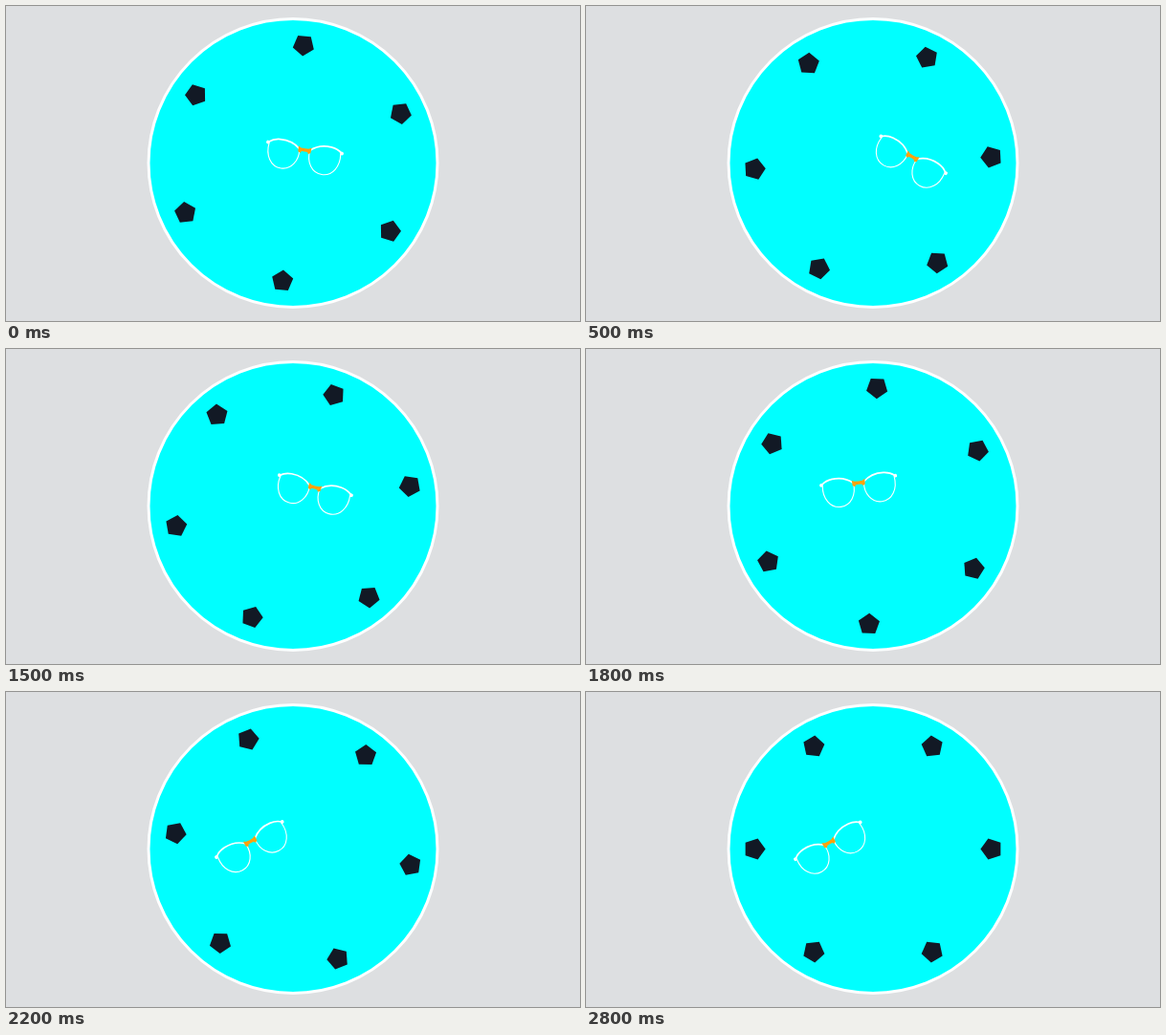
These frames come from a looping animation (600 px wide and 330 px high, 2.9 s). An HTML page with a canvas:

```html
<!DOCTYPE html>
<html lang="en">
<head>
<meta charset="utf-8">
<title>Swinging glasses</title>
<style>
  html, body { margin: 0; width: 100%; height: 100%; overflow: hidden; background: #dddfe1; }
  canvas { display: block; width: 600px; height: 330px; }
</style>
</head>
<body>
<canvas id="stage" width="600" height="330"></canvas>
<script>
const canvas = document.getElementById('stage');
const ctx = canvas.getContext('2d');
const scale = window.devicePixelRatio || 1;
canvas.width = 600 * scale;
canvas.height = 330 * scale;

const LOOP = 2900, STEP = 100;
const CENTER = { x: 300, y: 164.5 };
const ORBIT = 124, PENTAGON = 11.6;
const TILT = 29.7;
const rad = deg => deg * Math.PI / 180;
const mix = (a, b, p) => a + (b - a) * p;

// Ease-in-out, cubic-bezier(.42, 0, .58, 1)
function ease(x) {
  if (x <= 0) return 0;
  if (x >= 1) return 1;
  let lo = 0, hi = 1, t = 0.5;
  for (let i = 0; i < 24; i++) {
    t = (lo + hi) / 2;
    const bx = 3 * (1 - t) ** 2 * t * 0.42 + 3 * (1 - t) * t * t * 0.58 + t ** 3;
    if (bx < x) lo = t; else hi = t;
  }
  return t * t * (3 - 2 * t);
}
const progress = (time, start, duration) => ease((time - start) / duration);

// Swing to the right first, then over to the left along a higher arc
function poseAt(time) {
  if (time < 1000) {
    return {
      ring: mix(-30, 0, progress(time, -290, 1010)),
      tilt: mix(0, TILT, progress(time, -290, 767)),
      lift: 7.9
    };
  }
  return {
    ring: mix(0, -60, progress(time, 1083, 1490)),
    tilt: mix(TILT, -TILT, progress(time, 1073, 1265)),
    lift: 19.4
  };
}

function drawDisc() {
  ctx.beginPath();
  ctx.arc(CENTER.x, CENTER.y, 151, 0, Math.PI * 2);
  ctx.fillStyle = '#00ffff';
  ctx.fill();
  ctx.lineWidth = 3;
  ctx.strokeStyle = '#ffffff';
  ctx.stroke();
}

function drawRing(turn) {
  ctx.fillStyle = '#121925';
  for (let i = 0; i < 6; i++) {
    const a = rad(turn + i * 60);
    const cx = CENTER.x + ORBIT * Math.cos(a);
    const cy = CENTER.y + ORBIT * Math.sin(a);
    ctx.beginPath();
    for (let k = 0; k < 5; k++) {
      const v = a + Math.PI + rad(72 * k);
      ctx.lineTo(cx + PENTAGON * Math.cos(v), cy + PENTAGON * Math.sin(v));
    }
    ctx.fill();
  }
}

function drawLens(side) {
  ctx.save();
  ctx.scale(side, 1);
  ctx.strokeStyle = ctx.fillStyle = '#ffffff';
  ctx.lineCap = 'round';

  ctx.lineWidth = 1.1;
  ctx.beginPath();
  ctx.moveTo(5.5, 0);
  ctx.bezierCurveTo(4, 12, 11, 22.5, 21.5, 22.5);
  ctx.bezierCurveTo(33, 22.5, 39.5, 11, 37.8, -1.5);
  ctx.stroke();

  ctx.lineWidth = 1.7;
  ctx.beginPath();
  ctx.moveTo(5.5, -0.5);
  ctx.bezierCurveTo(12, -6.5, 20, -8, 27, -7.4);
  ctx.bezierCurveTo(32, -7, 36, -5, 38.5, -2.8);
  ctx.stroke();

  ctx.beginPath();
  ctx.arc(39, -2.5, 1.9, 0, Math.PI * 2);
  ctx.fill();
  ctx.restore();
}

function drawBridge() {
  const half = [[0, -1.7], [4, -2], [6.8, -3.5], [6.6, 2.2], [4.2, 3.4], [3, 1.6], [0, 1.5]];
  ctx.fillStyle = '#ffa20d';
  ctx.beginPath();
  half.forEach(([x, y]) => ctx.lineTo(x, y));
  half.slice().reverse().forEach(([x, y]) => ctx.lineTo(-x, y));
  ctx.fill();
}

function drawGlasses(tilt, lift) {
  const reach = a => 1.68 * a - 0.000246 * a ** 3;
  const q = reach(tilt) / reach(TILT);
  ctx.save();
  ctx.translate(297.5 + reach(tilt), 158 - lift * (1 - q * q));
  ctx.rotate(rad(tilt));
  drawLens(-1);
  drawLens(1);
  drawBridge();
  ctx.restore();
}

function draw(time) {
  const pose = poseAt(time);
  ctx.setTransform(scale, 0, 0, scale, 0, 0);
  ctx.fillStyle = '#dddfe1';
  ctx.fillRect(0, 0, 600, 330);
  drawDisc();
  drawRing(pose.ring);
  drawGlasses(pose.tilt, pose.lift);
}

const begin = performance.now();
function tick() {
  const time = (performance.now() - begin) % LOOP;
  draw(Math.floor(time / STEP) * STEP);
  requestAnimationFrame(tick);
}
tick();
</script>
</body>
</html>
```
